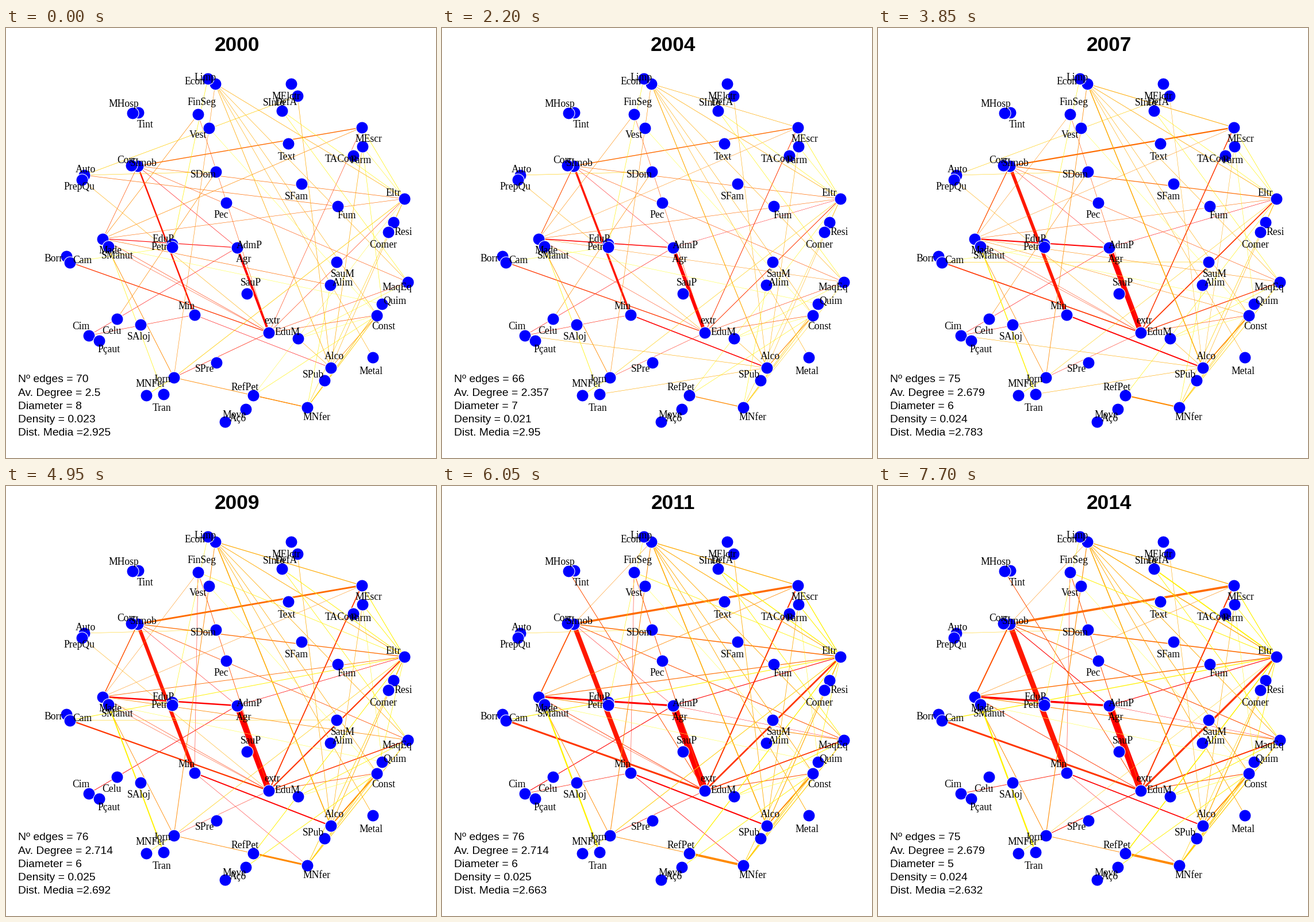
Recreate the animation shown at these times as a matplotlib script. Size 748 px wide and 748 px high, loop 8.25 s.

```python
import matplotlib.pyplot as plt
import numpy as np
from matplotlib.animation import FuncAnimation
from matplotlib.collections import LineCollection

SIZE, DPI = 748, 64
PT = 72 / DPI  # points per pixel
LAST = 14      # years after 2000

NODES = {
    "Limp": (364, 97), "Econ": (351, 88), "MElctr": (496, 97), "DefA": (507, 118),
    "SInfo": (480, 144), "FinSeg": (334, 150), "Vest": (353, 174), "Tint": (230, 147),
    "MHosp": (220, 148), "MEscr": (619, 173), "Farm": (620, 206), "TACour": (604, 222),
    "Text": (491, 201), "Corr": (229, 240), "SImob": (218, 239), "PrepQu": (136, 256),
    "Auto": (132, 264), "SDom": (365, 250), "SFam": (514, 271), "Pec": (383.5, 304),
    "Fum": (577, 310), "Eltr": (693, 297), "Resi": (674, 338), "Comer": (665, 354.5),
    "Made": (168.5, 366.5), "SManut": (178, 380), "Petr": (289, 376), "EduP": (289, 381),
    "AdmP": (402, 382), "Agr": (402, 382), "Borr": (105, 397), "Cam": (111.5, 407.5),
    "SauM": (575, 407), "Alim": (564.5, 447), "SauP": (419.5, 462), "MaqEq": (699.5, 442),
    "Quim": (654.5, 480), "Const": (645.5, 499.5), "Min": (328, 499), "Celu": (193, 506),
    "SAloj": (234, 516), "Cim": (144, 535), "Pçaut": (162.5, 543.5), "extr": (457.5, 530),
    "EduM": (508, 540), "Metal": (638.5, 573), "Alco": (565, 591), "SPub": (554, 612.5),
    "SPre": (366, 582), "Jorn": (292, 608), "MNFer": (244, 639), "Tran": (274, 637),
    "RefPet": (430.5, 639), "MNfer": (524, 660), "Move": (417, 663), "Aço": (381, 684.5),
}

LABELS = {
    "Limp": (347, 85), "Econ": (328, 92), "MElctr": (487, 118), "DefA": (487, 128),
    "SInfo": (466, 129), "FinSeg": (340, 128), "Vest": (334, 185), "Tint": (242, 167),
    "MHosp": (205, 131), "MEscr": (631, 192), "Farm": (617, 229), "TACour": (583, 227),
    "Text": (488, 223), "Corr": (209, 229), "SImob": (239, 234), "PrepQu": (127, 275),
    "Auto": (138, 245), "SDom": (343, 254), "SFam": (505, 292), "Pec": (374, 324),
    "Fum": (593, 325), "Eltr": (674, 286), "Resi": (691, 354), "Comer": (656, 376),
    "Made": (181, 386), "SManut": (194, 395), "Petr": (267, 380), "EduP": (274, 366),
    "AdmP": (423, 377), "Agr": (414, 401), "Borr": (83, 400), "Cam": (133, 403),
    "SauM": (586, 427), "Alim": (586, 442), "SauP": (426, 442), "MaqEq": (680, 450),
    "Quim": (676, 474), "Const": (657, 519), "Min": (314, 483), "Celu": (184, 527),
    "SAloj": (231, 537), "Cim": (130, 519), "Pçaut": (179, 558), "extr": (463, 509),
    "EduM": (489, 528), "Metal": (635, 596), "Alco": (571, 571), "SPub": (535, 602),
    "SPre": (346, 592), "Jorn": (272, 611), "MNFer": (251, 619), "Tran": (271, 660),
    "RefPet": (416, 624), "MNfer": (540, 676), "Move": (397, 672), "Aço": (403, 678),
}

RED, SCARLET, VERM = "#ff0000", "#ff1800", "#ff3600"
CORAL, RUST, ORANGE = "#ff5000", "#ff6c00", "#ff8a00"
AMBER, GOLD, YELLOW, PALE = "#ffaa00", "#ffcc00", "#fff200", "#ffff50"

links = []


def link(pair, color, *widths, span=(0, LAST), gap=()):
    """Add a line whose width runs through evenly spaced values over the years."""
    years = np.arange(LAST + 1)
    w = np.interp(years, np.linspace(0, LAST, len(widths)), widths)
    w[(years < span[0]) | (years > span[1])] = 0
    if gap:
        w[(years >= gap[0]) & (years <= gap[1])] = 0
    a, b = pair.split()
    links.append(((NODES[a], NODES[b]), color, w))


def fan(hub, ends, color, *widths, **kw):
    for end in ends.split():
        link(f"{hub} {end}", color, *widths, **kw)


link("Agr extr", RED, 4, 3.4, 6, 8.3, 9.8, 11, 13, 11.5)
link("Agr Made", RED, 1.1, 1.2, 1.5, 1.8, 2.2, 2.7, 3.5, 3.5)
link("Agr Cim", RED, .6, .6, .6, 1.1, 1, span=(0, 12))
link("AdmP Eltr", RED, .4, .4, .5, .6, 1.1, 1.1, span=(4, 14))
link("AdmP MaqEq", RED, .45, span=(11, 14))
link("Min Alco", RED, .6, .7, 1.6, 1.9, 2, 1.9, 2.3, 1.7)
link("Min Cim", SCARLET, .6, .6, .6, .9, gap=(9, 10))
link("Min MNfer", RED, .4, .4, .4, .4, .4, .5, 1.1, .5, span=(9, 14))
link("Min MEscr", RED, .4, span=(12, 12))
link("Corr Min", SCARLET, 2.5, 1.8, 3.6, 5.2, 6, 6.2, 10, 9.2)
link("Corr AdmP", RED, .6, .5, .5, .5, .5, .5, .5, 1.1, gap=(1, 3))
link("FinSeg extr", CORAL, .6, .6, .6, 1, 1)
link("FinSeg Min", SCARLET, .5, span=(9, 14))
link("extr Jorn", SCARLET, .7, .6, .5, .5, .5, .5, 1, 1.1, gap=(1, 3))
link("extr MEscr", VERM, .6, .6, 1, 1.4, 1.6, 2, 2, 2)
link("extr Eltr", VERM, .6, .6, 1, 1.5, 2, 2.3, 3.3, 3.3)
link("extr MaqEq", VERM, .6, .6, .6, 1.1, 1.5, 1.5, 2, 2)
link("extr Const", CORAL, .7, .7, .7, 1, 1.1)
link("extr Cam", VERM, 1.3, .6, 1.3, 1.4, 2, 2.5, 3.6, 3)
link("Made extr", VERM, .6, .5, .5, .5, .9, .9, gap=(1, 3))
link("SManut extr", VERM, .5, .5, .5, .5, .8, span=(0, 12), gap=(1, 5))
link("MHosp extr", CORAL, 1, span=(11, 14))

link("Corr MEscr", RUST, 1.4, .7, 1.4, 1.9, 2.5, 3.2, 3.7, 3.7)
link("Corr Eltr", RUST, .7, .7, .7, 1.1, 1.3, 1.3, 1.7, 1.6)
link("Corr MaqEq", CORAL, .6, .6, .6, 1, 1.1)
link("Corr Made", CORAL, .7, .7, 1.1, 1.2, 1.4, 1.5, 2, 2)
link("Corr Limp", ORANGE, .5, span=(11, 14))
link("PrepQu Fum", RUST, .7, span=(0, 1))
link("Made Eltr", RUST, .6, .6, .6, 1.1, 1.4)
link("Made MEscr", ORANGE, .7, .6, .5, .5, .5, .5, 1.1, .6)
link("Made FinSeg", ORANGE, .7, .6, .5, .5, .5, span=(0, 10))
link("Made Alim", RUST, .7, span=(0, 1))
link("Made MaqEq", ORANGE, .5, .5, .6, 1, 1.1, span=(4, 14))
link("Made Const", ORANGE, .6, span=(6, 8))
link("Made Jorn", ORANGE, .9, .9, .8, .9, 1)
link("SDom Celu", ORANGE, .7, .6, span=(0, 8))
link("Auto extr", AMBER, .6, .5, span=(0, 10))
link("Jorn MNfer", ORANGE, .9, gap=(1, 8))
link("RefPet MNfer", ORANGE, 1.3, 1.1, 1.3, 1.7, 2.5, 3.6, 4.2, 4)

link("Limp Jorn", ORANGE, .6, .6, .8, 1, 1.1)
link("Limp Alco", AMBER, .8, .8, 1.1, 1.4, 1.5, 1.6, 1.5, 1.5)
link("Limp Eltr", AMBER, .7, .7, .8, 1, 1.3)
link("Limp MEscr", AMBER, .6, .6, 1, 1.3, 1.3, span=(4, 14))
fan("Limp", "MaqEq Const Metal", AMBER, .6, .6, .6, .9, .9)
link("DefA Alco", AMBER, .7, .6, .5, .9, .6)
link("Alco Farm", AMBER, .7, .6, .5, .8, .7)
link("Alco Eltr", AMBER, .6, .5, .6, 1.1, 1.2)
link("Alco Const", ORANGE, .8, .8, 1.1, 1.6, 1.8, 2.3, 1.6, 1.8)
link("Alco EduM", AMBER, .6, span=(0, 8))
fan("Alco", "Tran Cim", AMBER, .6, span=(4, 8))
link("Jorn Eltr", GOLD, .8, .7, .5, .6, 1, .5)

link("PrepQu SDom", GOLD, .6, .6, .5, .5)
link("PrepQu DefA", GOLD, .7, .5, span=(0, 8), gap=(1, 5))
fan("MNfer", "Const Quim", GOLD, .9, .7, .7, 1, 1.2)
link("MNfer MaqEq", GOLD, .5, .5, 1, 1.2, span=(4, 14))
link("MNfer Eltr", GOLD, .6, .5, .9, .7)
link("MNfer Alim", YELLOW, .6, span=(0, 8))
link("MNFer Jorn", YELLOW, .8, .6)
link("MEscr Eltr", YELLOW, .7, .7, .7, 1.3, 1.2)
link("Farm Eltr", YELLOW, .5, .5, .6, 1.1, .9)
link("Farm Quim", YELLOW, .6, .5, .5, gap=(1, 4))
link("SInfo Eltr", YELLOW, .6, .6, .6, 1.2, 1.8)
link("SInfo MaqEq", YELLOW, .6, .6, .6, .9, .9)
link("FinSeg Eltr", YELLOW, .5, .5, .7, 1, span=(9, 14))
link("Eltr Const", YELLOW, .6, .6, .9, span=(8, 14))
link("EduM MaqEq", YELLOW, .5, .5, .6, 1, 1)
link("EduM Const", PALE, .6, .6, .9)
link("RefPet Eltr", YELLOW, .4, .5, .6, 1.2, 1.5)
link("RefPet Const", YELLOW, .6, .5, span=(0, 5))
link("Move Const", YELLOW, .9, span=(9, 14))
link("Econ EduP", YELLOW, .7, .6, .6, .6)
link("SManut Tran", YELLOW, .7, .7, .8, 1.2, 1.6, 2.2, 2.5, 2.4)
link("SManut Quim", PALE, .6)
link("Vest Const", PALE, .6)
link("Cam EduP", PALE, .8, .6, span=(0, 8))
link("Cam Eltr", YELLOW, .8, .8, 1.3, span=(9, 14))
link("Cam SauM", GOLD, .7, .6, .4, span=(2, 10), gap=(3, 6))

KEYS = [0, 2, 5, 7, 10, 12, 14]
EDGES = [70, 59, 69, 75, 76, 76, 75]
DIAMETER = [8, 6, 7, 6, 6, 6, 5]
DISTANCE = [2.925, 3.024, 2.913, 2.783, 2.647, 2.679, 2.632]


def stats(t):
    n = len(NODES)
    edges = int(round(np.interp(t, KEYS, EDGES)))
    return (
        f"Nº edges = {edges}",
        f"Av. Degree = {round(2 * edges / n, 3):g}",
        f"Diameter = {np.interp(t, KEYS, DIAMETER):.0f}",
        f"Density = {round(edges / (n * (n - 1)), 3):g}",
        f"Dist. Media ={round(np.interp(t, KEYS, DISTANCE), 3):g}",
    )


fig = plt.figure(figsize=(SIZE / DPI, SIZE / DPI), dpi=DPI, facecolor="white")
ax = fig.add_axes([0, 0, 1, 1])
ax.set(xlim=(0, SIZE), ylim=(SIZE, 0))
ax.axis("off")

lines = LineCollection([], capstyle="butt", zorder=1)
ax.add_collection(lines, autolim=False)

xs, ys = zip(*NODES.values())
ax.scatter(xs, ys, s=(21 * PT) ** 2, c="#0000ff", edgecolors="white",
           linewidths=1.1 * PT, zorder=2)
for name, (x, y) in LABELS.items():
    ax.text(x, y + 5.5, name, family="Liberation Serif", size=17.6 * PT,
            ha="center", va="baseline", zorder=3)

title = ax.text(402, 40, "", family="Liberation Sans", weight="bold",
                size=35.2 * PT, ha="center", va="baseline")
rows = [ax.text(21, 616.3 + 23.2 * i, "", family="Liberation Sans",
                size=19.2 * PT, va="baseline") for i in range(5)]


def draw(t):
    shown = [(seg, color, w[t] * PT) for seg, color, w in links if w[t] > 0]
    segs, colors, widths = zip(*shown)
    lines.set_segments(segs)
    lines.set_color(colors)
    lines.set_linewidth(widths)
    title.set_text(str(2000 + t))
    for row, text in zip(rows, stats(t)):
        row.set_text(text)
    return [lines, title, *rows]


anim = FuncAnimation(fig, draw, frames=LAST + 1, interval=550, repeat=True,
                     repeat_delay=0, blit=False)
plt.show()
```
